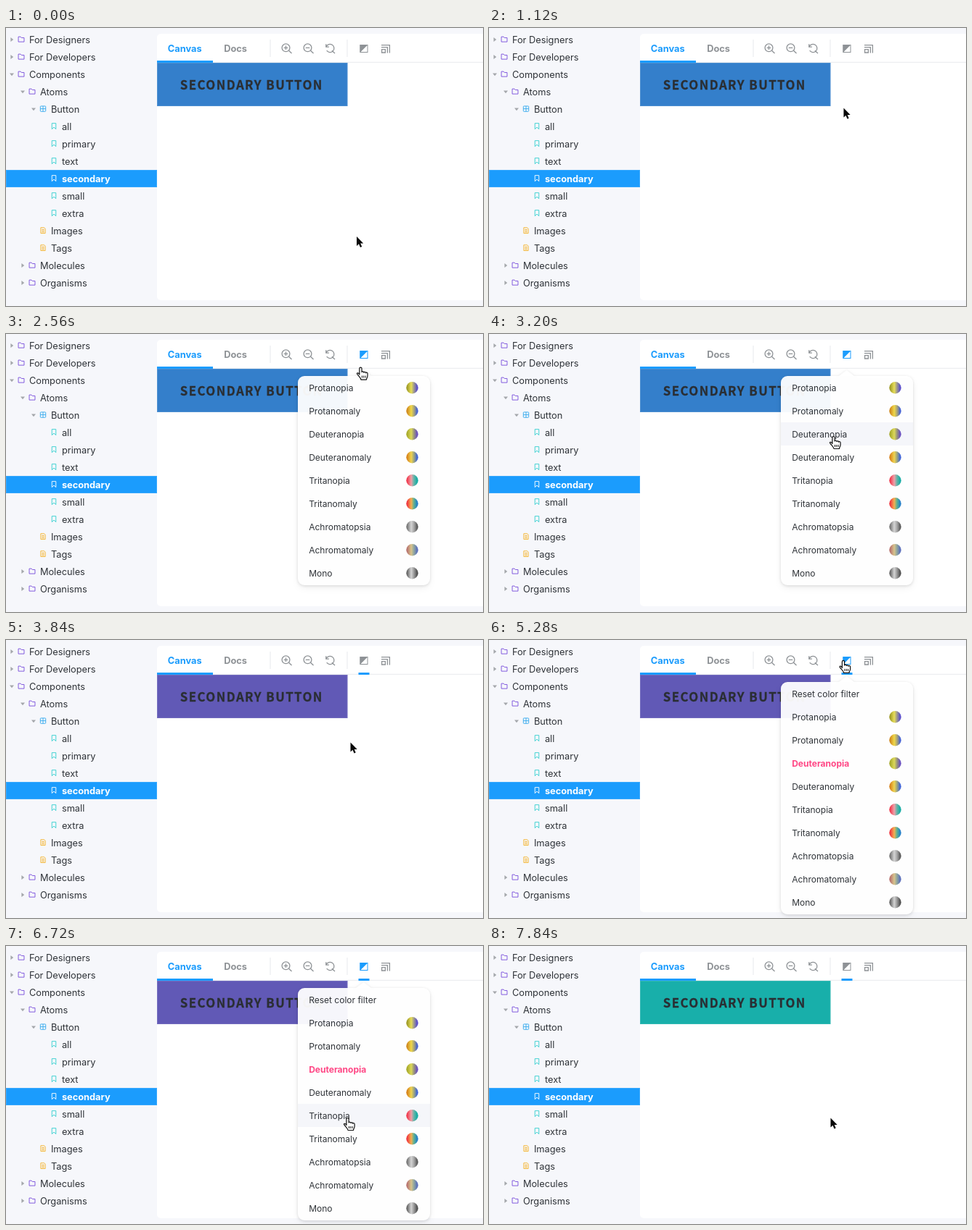
An HTML page that plays this animation: 657x384 px, repeating every 8 s.

```html
<!DOCTYPE html>
<html lang="en">
<head>
<meta charset="utf-8">
<title>Color filter menu</title>
<style>
  html, body { margin: 0; width: 100%; height: 100%; overflow: hidden; background: #f6f7fb; }
  svg { display: block; width: 657px; height: 384px; font: 12.8px Inter, "Open Sans", sans-serif; fill: #2f3338; }
  .bold { font-weight: 700; }
  .line { fill: none; stroke-width: 1; }
  .tool { fill: none; stroke: #8e9296; stroke-width: 1.3; }
  .caption { font: 700 16.8px "Noto Sans CJK JP", "Noto Sans CJK SC", "Noto Sans", sans-serif; letter-spacing: 1.45px; fill: #2a2e33; stroke: #2a2e33; stroke-width: .3; }
  .menu { font-size: 12px; }
  .popup { filter: drop-shadow(0 1px 2px rgba(0,0,0,.13)) drop-shadow(0 4px 4px rgba(0,0,0,.05)); }
</style>
</head>
<body>
<svg id="stage" viewBox="0 0 657 384"></svg>
<script>
const BLUE = '#1b9cfd', GRAY = '#8e9296', PINK = '#ff4785';
const LOOP = 8000, STEP = 160;

const icons = {
  folder: ['#7a4fdc', 'M-4.3 3.8V-3.8H-1L.3-2.3H4.3V3.8Z'],
  component: ['#35a9ee', 'M-4-3.2Q-4-4-3.2-4H3.2Q4-4 4-3.2V3.2Q4 4 3.2 4H-3.2Q-4 4-4 3.2ZM0-4V4M-4 0H4'],
  story: ['#35cfd0', 'M-3-4.3H3V4.4L0 1.6-3 4.4Z'],
  doc: ['#f5b32c', 'M-3.4-4.2H1.8L3.4-2.6V4.2H-3.4ZM-1.8-1.4H1.8M-1.8.5H1.8M-1.8 2.4H1.8']
};

// label, indent level, icon, arrow state
const tree = [
  ['For Designers', 0, 'folder', 'closed'], ['For Developers', 0, 'folder', 'closed'],
  ['Components', 0, 'folder', 'open'], ['Atoms', 1, 'folder', 'open'],
  ['Button', 2, 'component', 'open'], ['all', 3, 'story'], ['primary', 3, 'story'],
  ['text', 3, 'story'], ['secondary', 3, 'story'], ['small', 3, 'story'], ['extra', 3, 'story'],
  ['Images', 2, 'doc'], ['Tags', 2, 'doc'],
  ['Molecules', 1, 'folder', 'closed'], ['Organisms', 1, 'folder', 'closed']
];

const filters = {
  Protanopia: ['#a09c28', '#e8de58', '#9a9690', '#5a4ecc'],
  Protanomaly: ['#d08a20', '#f0d848', '#a8a478', '#4462d4'],
  Deuteranopia: ['#a8aa2c', '#dcd858', '#96927c', '#6a50c0'],
  Deuteranomaly: ['#d8841c', '#f0d450', '#9aa480', '#3e64d8'],
  Tritanopia: ['#f03c50', '#f0a0a8', '#60b4a8', '#14aca4'],
  Tritanomaly: ['#f03840', '#f4b050', '#58b094', '#2480c8'],
  Achromatopsia: ['#787878', '#d4d4d4', '#a4a4a4', '#5a5a5a'],
  Achromatomaly: ['#b87470', '#d8c48c', '#8ca4a0', '#5c70bc'],
  Mono: ['#686868', '#d4d4d4', '#969696', '#505050']
};
const names = Object.keys(filters);

// time, x, y of the pointer tip
const pointerPath = [
  [320, 483, 288], [1600, 491, 28.4], [2400, 491, 28.4], [3040, 474.5, 141.5],
  [4160, 474.5, 141.5], [4960, 488, 28.4], [5440, 488, 28.4], [6400, 470.5, 237.5]
];

const text = (x, y, label, attrs = '') => `<text x="${x}" y="${y}" ${attrs}>${label}</text>`;
const rect = (x, y, w, h, fill) => `<rect x="${x}" y="${y}" width="${w}" height="${h}" fill="${fill}"/>`;

// Block of colour with a slightly softened rim
const block = (x, y, w, h, fill) => rect(x, y, w, h, fill) +
  `<rect x="${x + .5}" y="${y + .5}" width="${w - 1}" height="${h - 1}" fill="none" stroke="#fff" stroke-opacity=".12"/>`;

function treeRow([label, level, icon, arrow], i) {
  const y = 16 + 24 * i, x = 15 * level, selected = label === 'secondary';
  const [color, shape] = icons[icon];
  const arrowShape = { closed: 'M-1.6-3L2.2 0-1.6 3Z', open: 'M-3-1.6H3L0 2.2Z' }[arrow];
  return (selected ? block(0, y - 12, 208, 24, BLUE) : '') +
    (arrowShape ? `<path d="${arrowShape}" fill="#a4a7ab" transform="translate(${x + 8} ${y})"/>` : '') +
    `<path class="line" d="${shape}" stroke="${selected ? '#fff' : color}" transform="translate(${x + 21} ${y - .4}) scale(.92)"/>` +
    text(x + 31.9, y + 4.7, label, selected ? 'class="bold" fill="#fff"' : '');
}

function toolbar(hot, active) {
  const color = hot ? BLUE : GRAY;
  const lens = (x, sign) => `<g class="tool" transform="translate(${x} 28)">
    <circle cx="-1" cy="-.7" r="5.4"/><path d="M3 3.2L7 7M-3.8-.7H1.8${sign}"/></g>`;
  return rect(208, 46.8, 449, 1, '#e8eaed') + rect(208, 45, 77, 3, BLUE) +
    text(222.8, 33.2, 'Canvas', `class="bold" fill="${BLUE}"`) +
    text(300.2, 33.2, 'Docs', 'class="bold" fill="#8e9296"') +
    rect(363.5, 16, 1, 24, '#e8eaed') + rect(469.5, 16, 1, 24, '#e8eaed') +
    lens(386.5, 'M-1-3.5V2.1') + lens(416.5, '') +
    `<path class="tool" d="M440.8 22.2V26.2H444.9M441.1 25.8A5.6 5.6 0 1 1 441.7 31.2M448.8 31.2L453 35"/>
     <rect x="488" y="23.5" width="10" height="10" fill="#fff" stroke="${color}"/>
     <path d="M487.5 23H498.5L487.5 34Z" fill="${color}"/>
     <path class="tool" stroke-width="1" d="M517 23.6H528.4V34.5M517 26.6H525.4V34.5M517.6 29.6H522.4V34H517.6Z"/>` +
    (active ? rect(485.5, 45, 15, 3, BLUE) : '');
}

function menu(selected, pointerY) {
  const items = selected ? ['Reset color filter', ...names] : names;
  const height = 32 * items.length + 1;
  const hovered = Math.floor((pointerY - 58) / 32);
  const rows = items.map((name, i) => {
    const y = 74 + 32 * i;
    return (i === hovered ? rect(402, y - 16, 182, 32, '#f5f6fa') : '') +
      text(417.2, y + 4.7, name, name === selected ? `class="bold" fill="${PINK}"` : '') +
      (filters[name] ? `<circle cx="559.5" cy="${y + .2}" r="8.2" fill="url(#${name})"/>` : '');
  });
  return `<g class="popup" fill="#fff"><path d="M482 58L492.5 50 503 58Z"/>
    <rect x="402" y="58" width="182" height="${height}" rx="9" fill-opacity=".95"/></g>
    <g class="menu">${rows.join('')}</g>`;
}

function pointer(x, y, hand) {
  const shape = hand
    ? `<path d="M-1.6 10V1.6A1.6 1.6 0 0 1 1.6 1.6V6.5A1.5 1.5 0 0 1 4.4 7A1.5 1.5 0 0 1 7.1 7.7A1.4 1.4 0 0 1 9.6 8.8V11.5C9.6 14 8.2 14.5 8 17H.6C.3 14.5-2.5 12.5-4.8 9.2C-5.6 7.8-3.6 6.6-1.6 9.6Z"
        fill="#fff" stroke="#111" stroke-width="1.2" stroke-linejoin="round"/>
       <path d="M2 11.5V14.5M4.3 11.5V14.5M6.6 11.5V14.5" stroke="#111"/>`
    : '<path d="M0 0V13L3 10.3 5 15 7.2 14.1 5.2 9.5H9.2Z" fill="#080808" stroke="#fff" stroke-width="1.2" paint-order="stroke"/>';
  return `<g transform="translate(${x} ${y})">${shape}</g>`;
}

function pointerAt(t) {
  const next = pointerPath.findIndex(p => p[0] > t);
  if (next === 0) return pointerPath[0].slice(1);
  if (next < 0) return pointerPath.at(-1).slice(1);
  const [t0, x0, y0] = pointerPath[next - 1], [t1, x1, y1] = pointerPath[next];
  const u = (t - t0) / (t1 - t0), e = u * u * (3 - 2 * u);
  return [x0 + (x1 - x0) * e, y0 + (y1 - y0) * e];
}

const defs = '<defs>' + names.map(name => `<linearGradient id="${name}">` +
  filters[name].map((c, i) => `<stop offset="${[.08, .42, .66, .92][i]}" stop-color="${c}"/>`).join('') +
  '</linearGradient>').join('') + '</defs>';
const backdrop = rect(0, 0, 657, 384, '#f6f7fb') + tree.map(treeRow).join('') +
  '<rect x="208" y="8" width="470" height="368" rx="5" fill="#fff"/>';

const stage = document.getElementById('stage');
stage.innerHTML = defs + backdrop + '<g id="scene"></g>';
const scene = document.getElementById('scene');

function draw(t) {
  const [x, y] = pointerAt(t);
  const open = (t >= 2240 && t < 3520) || (t >= 5120 && t < 7040);
  const overIcon = y < 42;
  const filter = t < 3520 ? '' : t < 7040 ? 'Deuteranopia' : 'Tritanopia';
  const fill = { '': '#347fcb', Deuteranopia: '#6159b6', Tritanopia: '#18afaa' }[filter];
  const ring = t >= 1760 && t < 2240;
  scene.innerHTML = toolbar(open || overIcon, filter) +
    block(208, 48, 262.5, 60, fill) + text(239.8, 85.4, 'SECONDARY BUTTON', 'class="caption"') +
    (open ? menu(filter, y) : '') +
    (ring ? '<circle cx="492" cy="28.5" r="30.6" fill="#fff" fill-opacity=".35" stroke="#151a20" stroke-width="1.8"/>' : '') +
    pointer(x, y, open || overIcon);
}

let shown = -1;
function tick() {
  const t = Math.floor(performance.now() % LOOP / STEP) * STEP;
  if (t !== shown) draw(shown = t);
  requestAnimationFrame(tick);
}
tick();
</script>
</body>
</html>
```
